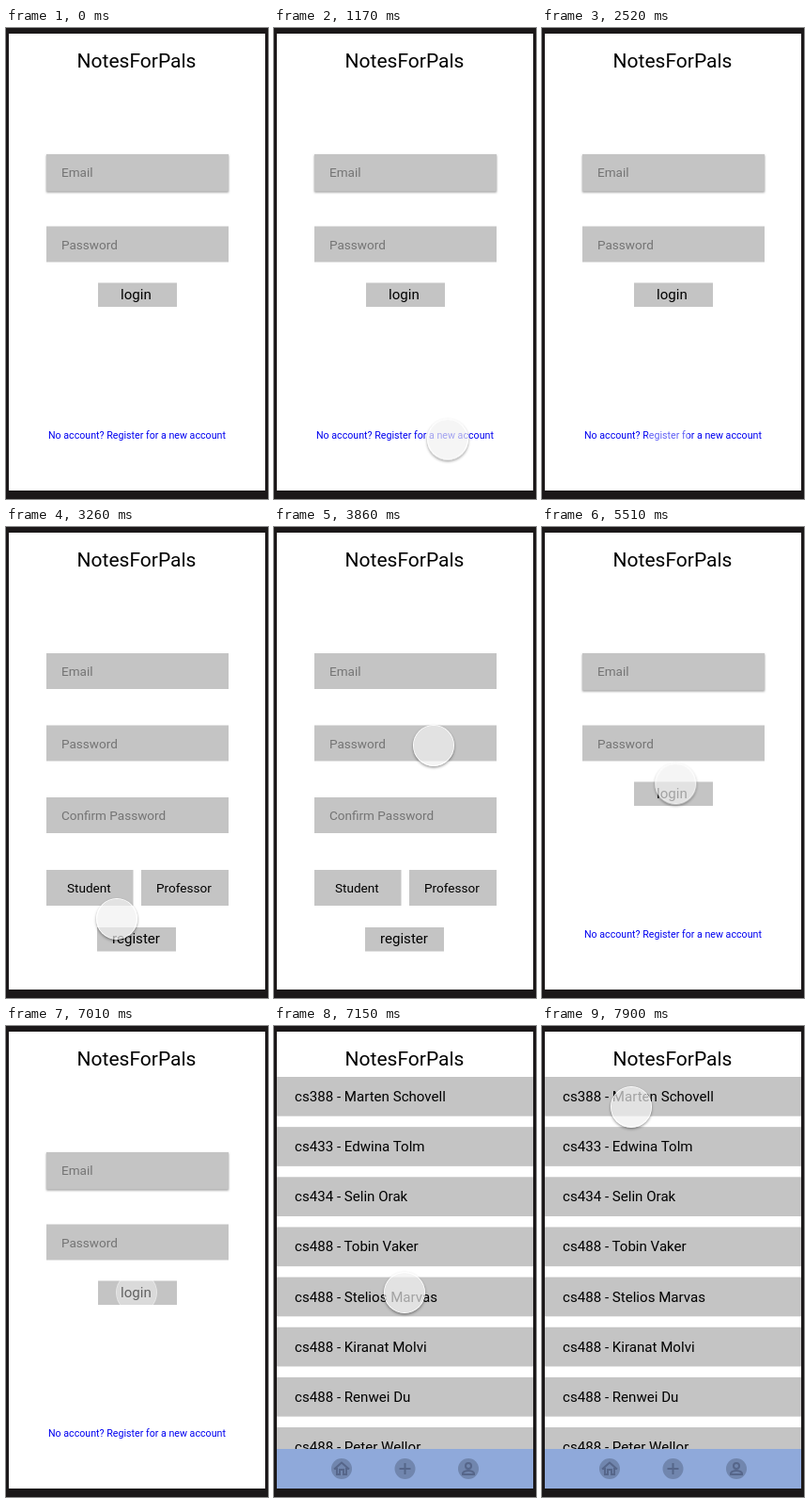
Write an HTML page that moves like this. It is 279 px wide and 500 px high and loops after 8000 ms.

```html
<!DOCTYPE html>
<html lang="en">
<head>
<meta charset="utf-8">
<title>Study app walkthrough</title>
<style>
html, body { margin: 0; width: 100%; height: 100%; overflow: hidden; background: #1b1819; }
svg { position: absolute; left: 0; top: 0; width: 279px; height: 500px; }
text { font-family: Roboto, "Open Sans", sans-serif; font-size: 15.1px; fill: #000; }
.title { font-size: 21px; text-anchor: middle; }
.hint { font-size: 13.55px; fill: #747474; }
.role { font-size: 13.55px; }
.link { font-size: 10.67px; fill: #0000f0; }
.box { fill: #c4c4c4; }
.raised { filter: drop-shadow(0 1.3px 1px rgba(0, 0, 0, .4)); }
.page { fill: #fff; }
.badge { fill: #7186ae; }
.glyph { fill: none; stroke: #56668a; stroke-width: 2; }

#register, #list, #cursor { animation: 8s step-end infinite; }
#register { animation-name: show-register; }
#list { animation-name: show-list; }
#cursor {
  position: absolute; left: -22px; top: -22px; width: 44px; height: 44px;
  box-sizing: border-box; border-radius: 50%;
  border: 1.5px solid rgba(255, 255, 255, .95);
  background: rgba(240, 240, 240, .68) padding-box;
  box-shadow: 0 1.5px 3px rgba(0, 0, 0, .4);
  animation-name: move, appear, press;
}

@keyframes show-register {
  0%, 63.25%, 100% { opacity: 0; }
  33.375% { opacity: 1; }
}
@keyframes show-list {
  0% { opacity: 0; }
  89.375%, 100% { opacity: 1; }
}
@keyframes appear {
  0%, 16.5% { opacity: 0; }
  3.75%, 24%, 100% { opacity: 1; }
}
@keyframes press {
  0%, 33.375%, 61.375%, 89.375%, 100% {
    border-color: rgba(255, 255, 255, .95);
    background-color: rgba(240, 240, 240, .68);
    box-shadow: 0 1.5px 3px rgba(0, 0, 0, .4);
  }
  31.5%, 59.5%, 87.625% {
    border-color: rgba(255, 255, 255, .6);
    background-color: rgba(255, 255, 255, .38);
    box-shadow: 0 0 0 rgba(0, 0, 0, 0);
  }
}
@keyframes move {
  0% { transform: translate(245px, 403px); }
  /* drift toward the link */
  3.75% { transform: translate(245px, 403px); animation-timing-function: steps(7); }
  16.5% { transform: translate(161px, 450px); }
  24% { transform: translate(148px, 436px); }
  25.875% { transform: translate(134.5px, 436.5px); }
  /* up across the form */
  37% { transform: translate(129px, 436px); }
  38.875% { transform: translate(121px, 430px); }
  40.75% { transform: translate(118px, 416px); animation-timing-function: steps(4); }
  48.25% { transform: translate(170px, 232px); }
  /* back down to the register button */
  50.125% { transform: translate(169px, 183px); }
  52% { transform: translate(165px, 262px); }
  53.875% { transform: translate(156px, 390px); }
  55.75% { transform: translate(150px, 440px); }
  57.625% { transform: translate(147px, 438px); }
  /* to the login button */
  67% { transform: translate(146px, 380px); }
  68.875% { transform: translate(142.3px, 272.5px); }
  76.375% { transform: translate(141px, 276px); }
  78.25% { transform: translate(140px, 280px); }
  80.125% { transform: translate(139px, 283px); }
  /* to the first course */
  93.125% { transform: translate(133px, 255px); }
  95% { transform: translate(118px, 180px); }
  96.875% { transform: translate(101px, 110px); }
  98.75%, 100% { transform: translate(95px, 86px); }
}
</style>
</head>
<body>
<svg viewBox="0 0 279 500">
  <rect class="page" x="3" y="6" width="273" height="485"/>

  <g id="login">
    <rect class="box raised" x="43" y="134" width="194" height="39.5"/>
    <text class="hint" x="59" y="158">Email</text>
    <rect class="box" x="43" y="210.5" width="194" height="38"/>
    <text class="hint" x="59" y="235">Password</text>
    <rect class="box" x="98" y="270.5" width="84" height="25.5"/>
    <text x="122" y="288">login</text>
    <text class="link" x="45" y="436">No account? Register for a new account</text>
  </g>

  <g id="register">
    <rect class="page" x="3" y="60" width="273" height="431"/>
    <rect class="box" x="43" y="134" width="194" height="38"/>
    <text class="hint" x="59" y="158">Email</text>
    <rect class="box" x="43" y="210.5" width="194" height="38"/>
    <text class="hint" x="59" y="235">Password</text>
    <rect class="box" x="43" y="287" width="194" height="38"/>
    <text class="hint" x="59" y="311">Confirm Password</text>
    <rect class="box" x="43" y="364" width="92.5" height="38"/>
    <text class="role" x="65" y="388">Student</text>
    <rect class="box" x="144" y="364" width="93" height="38"/>
    <text class="role" x="160" y="388">Professor</text>
    <rect class="box" x="97" y="425" width="84" height="25.5"/>
    <text x="113" y="442">register</text>
  </g>

  <g id="list">
    <rect class="page" x="3" y="50" width="273" height="441"/>
    <g id="rows"></g>
    <rect x="3" y="449" width="273" height="42" fill="#8fa9da"/>
    <g transform="translate(72 470)">
      <circle class="badge" r="11"/>
      <path class="glyph" d="M-8 0.5 L0 -6.5 L8 0.5 M-5 -1 V6 H-2 V1 H2 V6 H5 V-1"/>
    </g>
    <g transform="translate(139.5 470)">
      <circle class="badge" r="11"/>
      <path class="glyph" d="M-6 0 H6 M0 -6 V6"/>
    </g>
    <g transform="translate(207 470)">
      <circle class="badge" r="11"/>
      <circle class="glyph" cy="-3" r="3"/>
      <path class="glyph" d="M-6 6 V4.5 Q-4 2 0 2 T6 4.5 V6 Z"/>
    </g>
  </g>

  <text class="title" x="139" y="42">NotesForPals</text>
</svg>
<div id="cursor"></div>

<script>
const courses = [
  "cs388 - Marten Schovell",
  "cs433 - Edwina Tolm",
  "cs434 - Selin Orak",
  "cs488 - Tobin Vaker",
  "cs488 - Stelios Marvas",
  "cs488 - Kiranat Molvi",
  "cs488 - Renwei Du",
  "cs488 - Peter Wellor"
];
const pitch = 53.15;
document.getElementById("rows").innerHTML = courses.map((name, i) =>
  `<rect class="box" x="3" y="${54 + i * pitch}" width="273" height="41.7"/>
   <text x="22" y="${80 + i * pitch}">${name}</text>`).join("");
</script>
</body>
</html>
```
